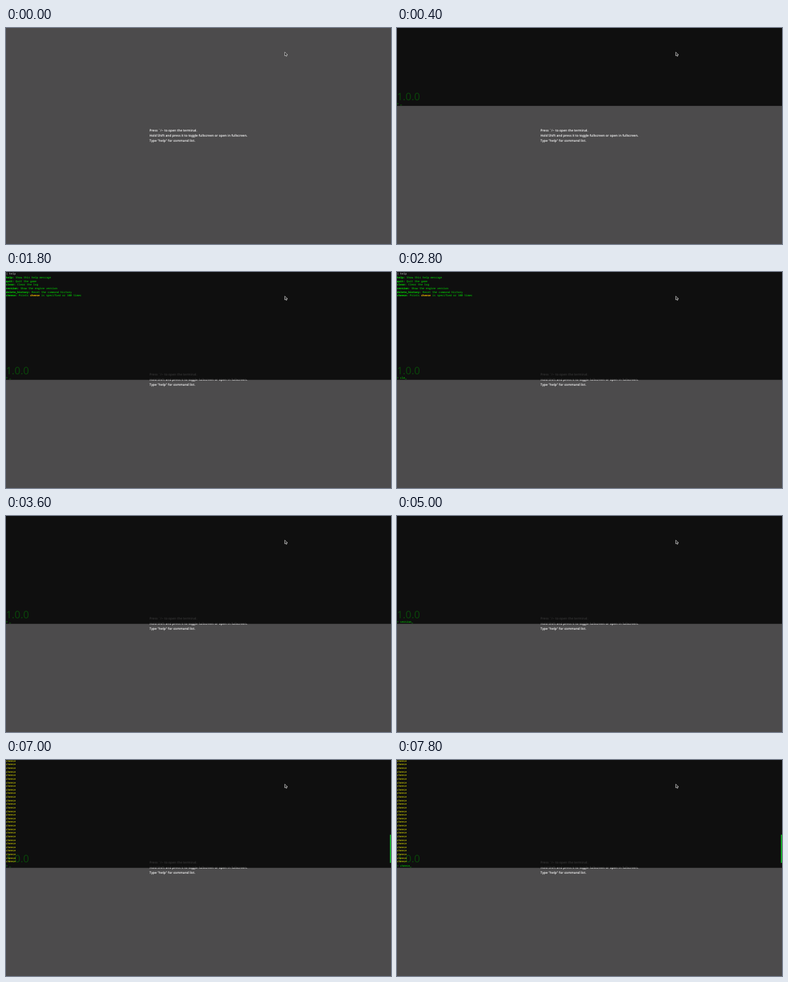
These frames come from a looping animation (600 by 338 pixels, 8000 ms). An HTML page:

```html
<!DOCTYPE html>
<html lang="en">
<head>
<meta charset="utf-8">
<title>Terminal overlay</title>
<style>
  html, body { margin: 0; width: 100%; height: 100%; overflow: hidden; background: #4c4b4c; }
  svg { display: block; width: 100vw; height: 100vh; }
  text { white-space: pre; text-rendering: geometricPrecision; }
  .hint { font: 600 16px "Open Sans", "Noto Sans", sans-serif; fill: #fff; }
  .version { font: 400 51px "Open Sans", "Noto Sans", sans-serif; fill: #0a480a; }
  .mono { font: 400 13.333px "Noto Sans Mono", "DejaVu Sans Mono", monospace; fill: #00ee00; }
  .name { font-weight: 700; }
  .echo { fill: #c4c4c4; }
  .accent { fill: #ffc400; font-weight: 700; }
  .cheese { fill: #f2f200; }
</style>
</head>
<body>
<svg viewBox="0 0 1920 1081.6" preserveAspectRatio="none">
  <defs>
    <clipPath id="logArea"><rect width="1920" height="520"/></clipPath>
  </defs>
  <rect width="1920" height="1082" fill="#4c4b4c"/>
  <g class="hint">
    <text x="715" y="519">Press `/~ to open the terminal.</text>
    <text x="715" y="545">Hold Shift and press it to toggle fullscreen or open in fullscreen.</text>
    <text x="715" y="571">Type "help" for command list.</text>
  </g>
  <g id="panel">
    <rect y="-540" width="1920" height="1080" fill="#000" fill-opacity=".8"/>
    <text class="version" x="0" y="512">1.0.0</text>
    <g id="log" class="mono" clip-path="url(#logArea)"></g>
    <rect id="thumb" x="1915" y="374" width="5" height="141" fill="#12c42c"/>
    <text id="input" class="mono" x="0" y="534"></text>
  </g>
  <path d="M1390 121v18l4-4 3 7 4-2-3-6h6z" fill="#111" stroke="#fff" stroke-width="2"/>
</svg>
<script>
const LOOP = 8000, LINE = 18, PANEL_HEIGHT = 540;
const byId = id => document.getElementById(id);
const panel = byId("panel"), log = byId("log"), thumb = byId("thumb"), input = byId("input");

const span = (text, cls) => `<tspan class="${cls}">${text}</tspan>`;
const entry = (name, info) => span(name + ":", "name") + " " + info;
const toLines = (lines, first) =>
  lines.map((line, i) => `<text x="0" y="${first + i * LINE}">${line}</text>`).join("");

const logs = {
  empty: "",
  help: toLines([
    span("[ help", "echo"),
    entry("help", "Show this help message"),
    entry("quit", "Quit the game"),
    entry("clear", "Clear the log"),
    entry("version", "Show the engine version"),
    entry("delete_history", "Reset the command history"),
    entry("cheese", "Prints " + span("cheese", "accent") + " is specified or 100 times")
  ], 14),
  version: toLines([span("[ version", "echo"), "Godot 4.1.3.stable.arch_linux"], 14),
  cheese: toLines(Array(29).fill(span("cheese", "cheese")), 9)
};

// Typed commands: start time, time per letter, time of Enter
const typed = [
  { word: "help", start: 800, step: 200, enter: 1600 },
  { word: "clear", start: 2400, step: 200, enter: 3400 },
  { word: "version", start: 3800, step: 200, enter: 5200 },
  { word: "cheese", start: 5800, step: 200, enter: 6600 },
  { word: "cheese", start: 6600, step: 0, enter: 7000 },
  { word: "cheese", start: 7600, step: 0, enter: LOOP }
];

const logTimes = [[0, "empty"], [1600, "help"], [3400, "empty"], [5200, "version"], [7000, "cheese"]];

function inputAt(t) {
  const cmd = typed.find(c => t >= c.start && t < c.enter);
  if (!cmd) return "";
  const count = cmd.step ? Math.floor((t - cmd.start) / cmd.step) + 1 : cmd.word.length;
  return cmd.word.slice(0, count);
}

let shownLog = "empty";

function draw(t) {
  const height = t < 400 ? 0 : t < 600 ? 390 : PANEL_HEIGHT;
  panel.setAttribute("transform", `translate(0 ${height - PANEL_HEIGHT})`);
  panel.style.display = height ? "" : "none";
  const name = logTimes.filter(([time]) => t >= time).pop()[1];
  if (name !== shownLog) {
    log.innerHTML = logs[name];
    shownLog = name;
  }
  thumb.style.display = name === "cheese" ? "" : "none";
  input.textContent = "> " + inputAt(t) + "_";
}

function tick() {
  draw(performance.now() % LOOP);
  requestAnimationFrame(tick);
}
tick();
</script>
</body>
</html>
```
